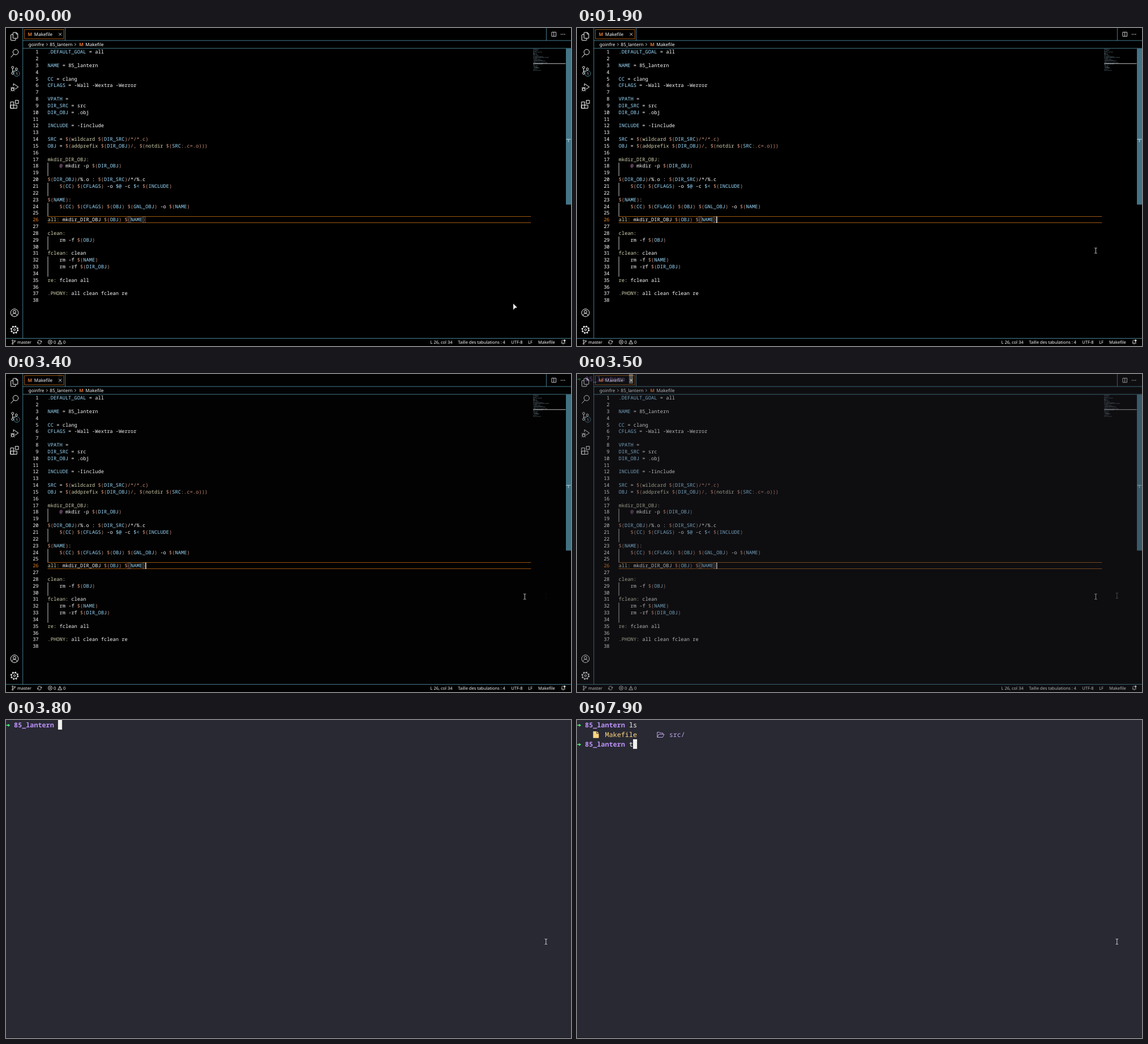
Recreate the animation shown at these times as an HTML page. Size 998x561 px, loop 8 s.

```html
<!DOCTYPE html>
<html lang="fr">
<head>
<meta charset="utf-8">
<title>Editor to terminal</title>
<style>
  html, body { margin: 0; width: 100%; height: 100%; overflow: hidden; background: #000; }
  svg { display: block; width: 998px; height: 561px; text-rendering: geometricPrecision; }
  text { white-space: pre; fill: #fff; }
  .ui { font: 8.11px "Noto Sans", sans-serif; }
  .status text { font-size: 7.48px; }
  .code { font: 8.73px "Noto Sans Mono", monospace; }
  .shell { font: 11.78px "Noto Sans Mono", monospace; }
  .shell text { fill: #f8f8f2; }
  .path { font-weight: 700; fill: #bd93f9; }
  .shell .file { fill: #ffd580; }
  .shell .dir { fill: #bfa3e6; }
  .make { fill: #e37933; font-weight: 800; }
  .var { fill: #9cdcfe; }
  .fn { fill: #d8d6b4; }
  .str { fill: #ce9178; }
  .key { fill: #c586c0; }
  .line { fill: none; stroke: #fff; }
  .frame { fill: none; stroke: #6fc3df; stroke-width: .65; }
  .active { fill: none; stroke: #f38518; stroke-width: .65; }

  .anim { animation: 8s step-end -30ms infinite; }
  #caret { animation-name: blink; }
  #arrow { animation-name: travel; }
  #beam { animation-name: beam; }
  #terminal { animation-name: fade; }
  #block { animation-name: block; }
  #typed-l { animation-name: show-l; }
  #typed-s { animation-name: show-s; }
  #listing { animation-name: show-listing; }
  #typed-t { animation-name: show-t; }

  @keyframes blink {
    0%, 17.5%, 30% { opacity: 0; }
    11.25%, 23.75%, 36.25%, to { opacity: 1; }
  }
  @keyframes travel {
    0% { transform: translate(896px, 486.3px); }
    1.25% { transform: translate(903px, 476px); }
    2.5% { transform: translate(924px, 450px); }
    3.75% { transform: translate(953px, 418px); }
    5% { transform: translate(974px, 396px); }
    6.25% { transform: translate(981px, 388px); }
    11.25% { transform: translate(968px, 390px); }
    12.5% { transform: translate(936px, 391px); opacity: 1; }
    13.75%, to { transform: translate(916px, 393px); opacity: 0; }
  }
  @keyframes beam { 0% { opacity: 0; } 13.75%, to { opacity: 1; } }
  @keyframes fade {
    0% { opacity: 0; }
    42.5% { opacity: .05; }
    43.75% { opacity: .35; }
    45% { opacity: .65; }
    46.25% { opacity: .95; }
    47.5%, to { opacity: 1; }
  }
  @keyframes block {
    0% { transform: translate(91.9px, 0); }
    88.75% { transform: translate(99px, 0); }
    90% { transform: translate(106.1px, 0); }
    91.25% { transform: translate(0, 17px); }
    93.75% { transform: translate(91.9px, 34px); }
    97.5%, to { transform: translate(99px, 34px); }
  }
  @keyframes show-l { 0% { opacity: 0; } 88.75%, to { opacity: 1; } }
  @keyframes show-s { 0% { opacity: 0; } 90%, to { opacity: 1; } }
  @keyframes show-listing { 0% { opacity: 0; } 93.75%, to { opacity: 1; } }
  @keyframes show-t { 0% { opacity: 0; } 97.5%, to { opacity: 1; } }
</style>
</head>
<body>
<svg viewBox="0 0 998 561">
  <defs>
    <path id="ibeam" class="line" stroke-width=".8" d="M-2.2-4.6h1.6l.6.5.6-.5h1.6M0-4.1v8.2M-2.2 4.6h1.6l.6-.5.6.5h1.6"/>
    <g id="prompt">
      <path d="M.5 8.6h3.2V6.7L7.1 9.3 3.7 12v-1.9H.5z" fill="#50fa7b"/>
      <text class="path" x="14.1" y="13">85_lantern</text>
    </g>
  </defs>

  <rect width="998" height="561"/>

  <!-- Activity bar: icons on a 24 unit grid -->
  <g class="line" stroke-width="1.6">
    <g transform="translate(7.5 7.4) scale(.625)">
      <path d="M8.5.75h9l3.750 3.750v12l-.7.75H8.500l-.75-.75V1.500zM16.750.75V5.250h4.500M7 6.750H2.500l-.75.75v15l.75.75h12l.75-.75V18"/>
    </g>
    <g transform="translate(7.5 37.3) scale(.625)">
      <circle cx="15.25" cy="8.25" r="7.5"/><path d="M10.200 13.800 1.600 23.400"/>
    </g>
    <g transform="translate(7.5 67.2) scale(.625)">
      <circle cx="6.8" cy="3.7" r="3"/><circle cx="6.8" cy="20.2" r="3"/><circle cx="17.3" cy="8.2" r="3"/>
      <path d="M6.800 6.700v10.500M17.300 11.200c-.5 1.800-1.800 3-3.800 3h-3c-1.800 0-3.400 1.200-3.700 3"/>
    </g>
    <g transform="translate(7.5 97.2) scale(.625)">
      <path d="M9 8V1.500L22.800 11 13.500 17.300M1 17h3M10 17h3M1.500 11.500l3 2.500M12.500 11.500l-3 2.500M1.500 22.500l3-2.500M12.500 22.500l-3-2.500M4 14.500h6"/>
      <ellipse cx="7" cy="17" rx="3.2" ry="5.2"/>
    </g>
    <g transform="translate(7.5 127.1) scale(.625)">
      <path d="M14.250.75h9v9h-9zM.75 5.250h9v18h-9zM.75 14.250h18v9h-18z"/>
    </g>
    <g transform="translate(7.5 494.9) scale(.625)">
      <circle cx="12" cy="12" r="10.8"/><circle cx="12" cy="9.3" r="4"/><path d="M5 20c.5-8.500 13.500-8.500 14 0"/>
    </g>
    <g transform="translate(7.5 524.8) scale(.625)">
      <circle cx="12" cy="12" r="8.2"/><circle cx="12" cy="12" r="2.8"/>
      <circle cx="12" cy="12" r="10" stroke-width="3" stroke-dasharray="3.927"/>
    </g>
  </g>
  <circle cx="19" cy="80.3" r="5" class="frame" style="fill:#000"/>
  <text class="ui" x="19" y="82.700" text-anchor="middle" style="font-size:6.5px">1</text>

  <!-- Tab bar and breadcrumbs -->
  <path class="frame" d="M29.700 0V547.500M30 22.100H998M30 35.900H998M0 547.500H998M104.500 0V22M954.400 0V22"/>
  <rect class="active" x="32.7" y="2.8" width="69.3" height="16.2"/>
  <g class="ui">
    <text class="make" x="38.5" y="14.3">M</text>
    <text x="49.8" y="13.8">Makefile</text>
    <text x="39.8" y="32">goinfre</text>
    <text x="77.3" y="32">85_lantern</text>
    <text class="make" x="129.3" y="32.4">M</text>
    <text x="140.3" y="32">Makefile</text>
  </g>
  <g class="line" stroke-width=".8">
    <path d="M93.300 8.700l4.800 4.800M98.100 8.700l-4.800 4.800M71.200 26.800l2.200 2.300-2.200 2.300M121.200 26.800l2.200 2.300-2.200 2.300"/>
    <path d="M964 7.300h7.500v7.500H964zM967.700 7.300v7.500"/>
    <path d="M980 11.200h1.300M983 11.200h1.300M986 11.200h1.300" stroke-width="1.3"/>
  </g>

  <!-- Editor -->
  <path class="active" d="M73.500 332.500H927.300M73.500 343.500H927.300"/>
  <g id="code" class="code"></g>
  <path d="M215.200 333.300h5v10h-5zM241.300 333.300h5v10h-5z" fill="none" stroke="#888" stroke-width=".6"/>
  <rect id="caret" class="anim" x="246.2" y="332.7" width="1.4" height="11.2" fill="#fff"/>
  <g id="minimap" fill="#a9cbdc" opacity=".45"></g>
  <path d="M931 62.800h57.500" stroke="#ddd" stroke-width=".9"/>
  <rect x="989" y="36.2" width="9" height="275.3" fill="#437586"/>
  <path d="M989.500 196.300h8M993.500 196.300v5" stroke="#a3c9d5" stroke-width="1.2"/>

  <!-- Status bar -->
  <g class="ui status">
    <text x="20" y="556.8">master</text>
    <text x="84" y="556.8">0</text>
    <text x="101" y="556.8">0</text>
    <text x="749.6" y="556.8">L 26, col 34</text>
    <text x="798.2" y="556.8">Taille des tabulations : 4</text>
    <text x="892.3" y="556.8">UTF-8</text>
    <text x="922.2" y="556.8">LF</text>
    <text x="940" y="556.8">Makefile</text>
  </g>
  <g class="line" stroke-width=".8">
    <circle cx="11.7" cy="551.3" r="1.1"/><circle cx="11.7" cy="557" r="1.1"/><circle cx="15.5" cy="552.3" r="1.1"/>
    <path d="M11.700 552.400v3.500M15.500 553.400c0 1.600-3.800.8-3.800 2.200"/>
    <path d="M56 553.500a3.300 3.300 0 0 1 6-1.200M62.300 554.700a3.300 3.300 0 0 1-6 1.200M60.500 553.500h2.700l-.8-1.800M58 554.700h-2.700l.8 1.800"/>
    <circle cx="78" cy="554" r="3.5"/><path d="M76.500 552.500l3 3M79.500 552.500l-3 3"/>
    <path d="M95.200 550.700l3.500 6.500h-7zM95.200 553v2.200M95.200 555.800v.6"/>
    <path d="M981 556h6.500l-.8-1.600v-1.800M981 556l.9-1.600v-2c0-1.300 1-2 2.200-2M983.300 557.300h1.800"/>
    <circle cx="986.6" cy="551.3" r="1.4" fill="#fff"/>
  </g>

  <path id="arrow" class="anim" d="M0 0l7 7-4 .6L.2 11z" fill="#fff"/>
  <g id="beam" class="anim"><use href="#ibeam" x="916.3" y="392.7"/></g>

  <!-- Terminal -->
  <g id="terminal" class="anim shell">
    <rect width="998" height="561" fill="#282933"/>
    <rect y="560" width="998" height="1" fill="#1b1c23"/>
    <use href="#prompt"/>
    <text id="typed-l" class="anim" x="91.9" y="13">l</text>
    <text id="typed-s" class="anim" x="99" y="13">s</text>
    <g id="listing" class="anim">
      <path d="M28.500 20h5.800v4.200h4.200v7.600h-10zM35.200 20l3.300 3.300h-3.300z" fill="#ffd580"/>
      <text class="file" x="49.5" y="30">Makefile</text>
      <path d="M141.800 30.500v-9h4l1.300 1.500h4.600v2.200M141.800 30.500l2.700-5.300h9.500l-2.700 5.300z" fill="none" stroke="#bfa3e6" stroke-linejoin="round"/>
      <text class="dir" x="162.7" y="30">src/</text>
      <use href="#prompt" y="34"/>
    </g>
    <text id="typed-t" class="anim" x="91.9" y="47">t</text>
    <rect id="block" class="anim" width="7.1" height="16.9" fill="#f0f0ee"/>
    <use href="#ibeam" x="953.8" y="391"/>
  </g>
</svg>

<script>
const makefile = `.DEFAULT_GOAL = all

NAME = 85_lantern

CC = clang
CFLAGS = -Wall -Wextra -Werror

VPATH =
DIR_SRC = src
DIR_OBJ = .obj

INCLUDE = -Iinclude

SRC = $(wildcard $(DIR_SRC)/*/*.c)
OBJ = $(addprefix $(DIR_OBJ)/, $(notdir $(SRC:.c=.o)))

mkdir_DIR_OBJ:
    @ mkdir -p $(DIR_OBJ)

$(DIR_OBJ)/%.o : $(DIR_SRC)/*/%.c
    $(CC) $(CFLAGS) -o $@ -c $< $(INCLUDE)

$(NAME):
    $(CC) $(CFLAGS) $(OBJ) $(GNL_OBJ) -o $(NAME)

all: mkdir_DIR_OBJ $(OBJ) $(NAME)

clean:
    rm -f $(OBJ)

fclean: clean
    rm -f $(NAME)
    rm -rf $(DIR_OBJ)

re: fclean all

.PHONY: all clean fclean re
`;

const left = 73.5, top0 = 36.2, baseline = 45.2, lineHeight = 11.84, charWidth = 5.239;
const currentLine = 26;
const guides = [[18, 19], [21, 22], [24, 25], [29, 30], [32, 34]];
const tokens = /(^\.?\w+(?= =)|\$[@<]|(?<=\$\()[A-Z_]+)|(^\.?\w+:|wildcard|addprefix|notdir)|(\$\(|\)|\/\*\/\*\.c|\/,|:\.c=\.o)|(@)/g;
const kinds = ['var', 'fn', 'str', 'key'];

const highlight = line => line.replace(tokens, (token, ...groups) => {
  const kind = kinds[groups.findIndex(Boolean)];
  return `<tspan class="${kind}">${token.replace('<', '&lt;')}</tspan>`;
});

let code = '', minimap = '';
makefile.split('\n').forEach((line, i) => {
  const y = baseline + i * lineHeight;
  const source = line.trimStart();
  const x = left + (line.length - source.length) * charWidth;
  const color = i + 1 === currentLine ? '#f38518' : '#fff';
  code += `<text x="57.6" y="${y}" text-anchor="end" style="fill:${color}">${i + 1}</text>`;
  code += `<text x="${x}" y="${y}">${highlight(source)}</text>`;
  for (const word of line.matchAll(/\S+/g)) {
    minimap += `<rect x="${931 + word.index * .52}" y="${37 + i * 1.04}" width="${word[0].length * .52}" height=".8"/>`;
  }
});
for (const [first, last] of guides) {
  const y = top0 + (first - 1) * lineHeight;
  code += `<rect x="73.6" y="${y}" width=".8" height="${(last - first + 1) * lineHeight}" fill="#fff"/>`;
}
document.getElementById('code').innerHTML = code;
document.getElementById('minimap').innerHTML = minimap;
</script>
</body>
</html>
```
